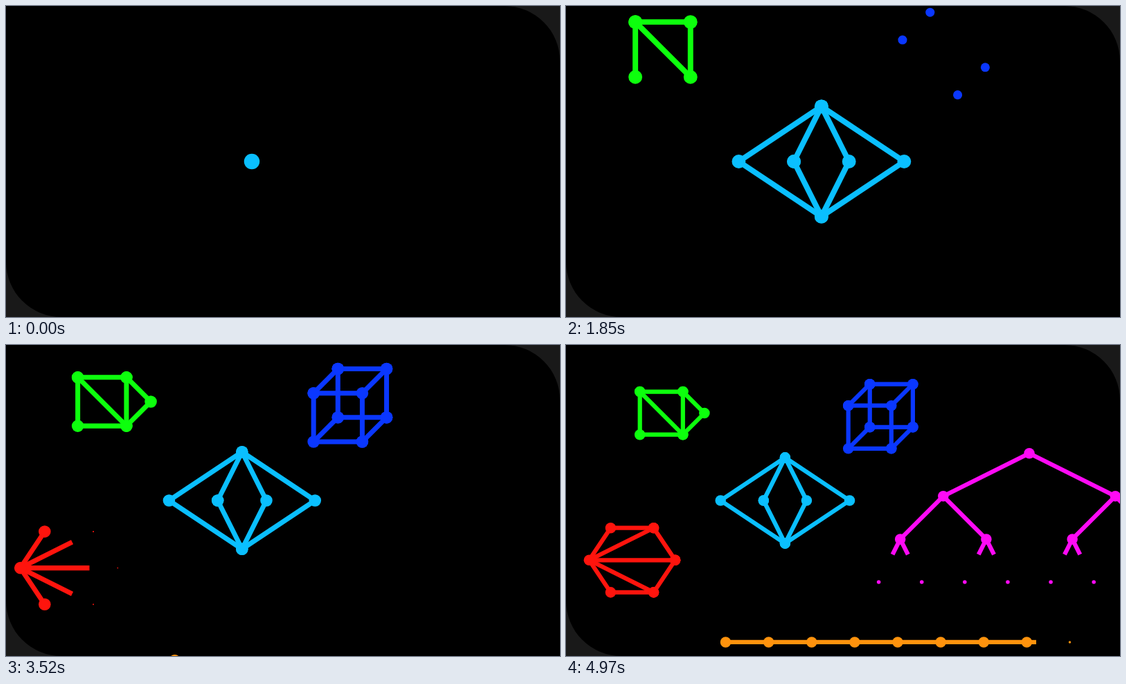
An HTML page with a canvas that plays this animation: 800x450 px, repeating every 5 s.

```html
<!DOCTYPE html>
<html lang="en">
<head>
<meta charset="utf-8">
<title>Growing graphs</title>
<style>
html, body { margin: 0; width: 100%; height: 100%; overflow: hidden; background: #191919; }
canvas { display: block; width: 800px; height: 450px; }
</style>
</head>
<body>
<canvas id="stage" width="800" height="450"></canvas>
<script>
const ctx = document.getElementById('stage').getContext('2d');
const LOOP = 5000, FPS = 33, TICKS = 165;
const STEP = 6.6, WAVE = 13.6; // ticks for one edge, for one wave of edges

const range = (n, fn) => Array.from({ length: n }, (_, i) => fn(i));

// Positions are in grid units from the centre of the diamond.
const graph = (color, x, y, points) => ({
  color, points: points.map(([px, py]) => [x + px, y + py]), nodes: [], edges: []
});

const addNode = (g, to, start, len) => g.nodes.push({ to, start, len });
const addEdge = (g, from, to, start, len) => g.edges.push({ from, to, start, len });

// An edge together with the node at its end.
function extend(g, from, to, start, len) {
  addEdge(g, from, to, start, len);
  addNode(g, to, start, len);
}

// One edge after another along a walk through the nodes.
function trail(g, walk, start) {
  addNode(g, walk[0], start - STEP, STEP);
  for (let i = 1; i < walk.length; i++) {
    extend(g, walk[i - 1], walk[i], start + (i - 1) * STEP, STEP);
  }
  return g;
}

function makeDiamond() {
  const g = graph('#0abfff', 0, 0, [[-.5, 0], [0, -1], [.5, 0], [0, 1], [1.5, 0], [-1.5, 0]]);
  return trail(g, [0, 1, 2, 3, 4, 1, 5, 3, 0], 0);
}

function makeHouse() {
  const g = graph('#0dff0d', -3.375, -2.535, [[0, 0], [1, 0], [1, 1], [0, 1], [1.5, .5]]);
  return trail(g, [0, 1, 2, 0, 3, 2, 4, 1], 33.3);
}

// The bits of a corner's index are its x, y and depth.
function makeCube() {
  const bit = (n, axis) => n >> axis & 1;
  const g = graph('#0a37ff', 1.47, -2.21,
    range(8, n => [bit(n, 0) + bit(n, 2) / 2, bit(n, 1) - bit(n, 2) / 2]));
  const start = 57 + STEP;
  for (let n = 0; n < 8; n++) {
    const diagonal = bit(n, 0) === bit(n, 1);
    if (diagonal) addNode(g, n, start - STEP, STEP);
    [diagonal, !diagonal, !bit(n, 2)].forEach((grows, axis) => {
      if (grows) extend(g, n, n ^ 1 << axis, start + axis * WAVE, WAVE);
    });
  }
  return g;
}

// A ring that closes from both sides, with a fan from its first node.
function makeHexagon() {
  const angle = i => i * Math.PI / 3, start = 99.8;
  const g = graph('#ff140d', -4.555, 1.389,
    range(6, i => [1 - Math.cos(angle(i)), -.866 * Math.sin(angle(i))]));
  addNode(g, 0, start - WAVE, WAVE);
  for (let i = 1; i <= 3; i++) {
    const at = start + (i - 1) * WAVE;
    extend(g, i - 1, i, at, WAVE);
    extend(g, (7 - i) % 6, 6 - i, at, WAVE);
    addEdge(g, 0, i + 1, start, WAVE * 1.85);
    addNode(g, i + 1, start + WAVE, WAVE);
  }
  return g;
}

function makeChain() {
  const g = graph('#ff930d', -1.382, 3.299, range(10, i => [i, 0]));
  return trail(g, range(10, i => i), 115.8);
}

// Binary tree in heap order.
function makeTree() {
  const level = i => Math.floor(Math.log2(i + 1)), start = 131.3;
  const g = graph('#ff0af5', 5.677, -1.1, range(15, i => {
    const count = 2 ** level(i);
    return [(i + 1 - count - (count - 1) / 2) * 8 / count, level(i)];
  }));
  addNode(g, 0, start - WAVE, WAVE);
  for (let i = 1; i < 15; i++) {
    extend(g, (i - 1) >> 1, i, start + (level(i) - 1) * WAVE, WAVE);
  }
  return g;
}

const graphs = [makeDiamond(), makeHouse(), makeCube(), makeHexagon(), makeChain(), makeTree()];

function progress(tick, { start, len }) {
  const p = Math.min(1, Math.max(0, (tick - start) / len));
  return p * p * (3 - 2 * p);
}

function drawGraph(g, tick, unit, cx) {
  const place = i => [cx + g.points[i][0] * unit, 225 + g.points[i][1] * unit];
  ctx.strokeStyle = ctx.fillStyle = g.color;
  ctx.lineWidth = unit * .1;
  for (const e of g.edges) {
    const p = progress(tick, e);
    if (!p) continue;
    const [ax, ay] = place(e.from), [bx, by] = place(e.to);
    ctx.beginPath();
    ctx.moveTo(ax, ay);
    ctx.lineTo(ax + (bx - ax) * p, ay + (by - ay) * p);
    ctx.stroke();
  }
  for (const n of g.nodes) {
    const p = progress(tick, n);
    if (!p) continue;
    ctx.beginPath();
    ctx.arc(...place(n.to), unit * .125 * p, 0, Math.PI * 2);
    ctx.fill();
  }
}

function drawPanel() {
  ctx.fillStyle = '#191919';
  ctx.fillRect(0, 0, 800, 450);
  ctx.fillStyle = '#000';
  ctx.beginPath();
  ctx.roundRect(0, 0, 800, 450, [0, 80, 0, 80]);
  ctx.fill();
}

// The view zooms out evenly around a point left of the centre.
function draw(ms) {
  const tick = Math.floor((ms % LOOP + 4.99) * FPS / 1000) % TICKS;
  const unit = 90 - .17 * tick, cx = 130 + 3 * unit;
  drawPanel();
  graphs.forEach(g => drawGraph(g, tick, unit, cx));
}

let begin;
function loop(now) {
  begin ??= now;
  draw(Math.max(0, now - begin));
  requestAnimationFrame(loop);
}
draw(0);
requestAnimationFrame(loop);
</script>
</body>
</html>
```
